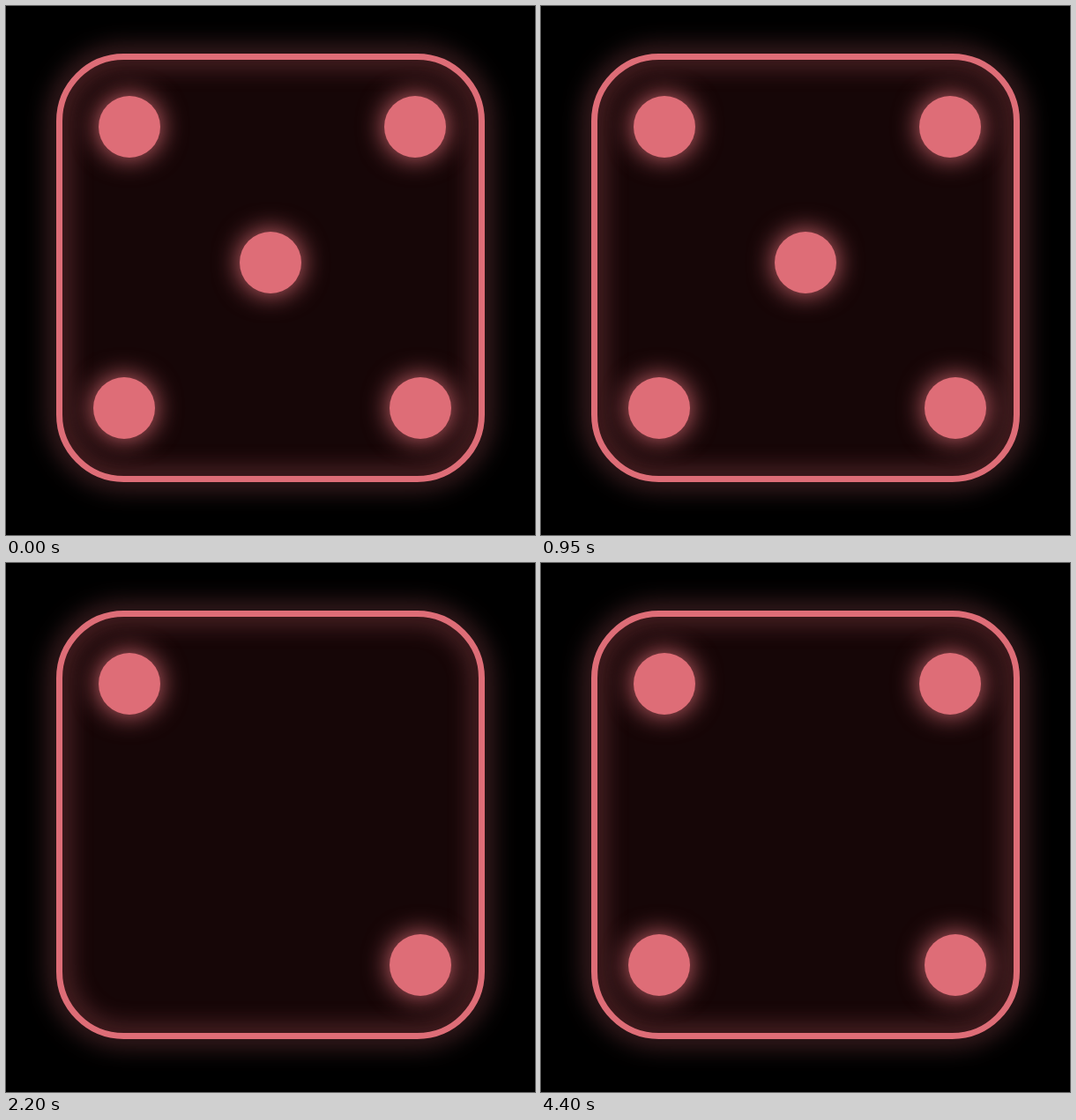
Animation of 600x600 px, one loop 9.4 s. Source, as an HTML page:

```html
<!DOCTYPE html>
<html lang="en">
<head>
<meta charset="utf-8">
<title>Rolling die</title>
<style>
  html, body { margin: 0; width: 100%; height: 100%; overflow: hidden; background: #000; }
  svg { display: block; width: 100%; height: 100%; }
</style>
</head>
<body>
<svg viewBox="0 0 600 600">
  <defs>
    <filter id="glow" filterUnits="userSpaceOnUse" x="0" y="0" width="600" height="600" color-interpolation-filters="sRGB">
      <feDropShadow dx="0" dy="0" stdDeviation="15" flood-color="#de6d77"/>
    </filter>
  </defs>
  <rect x="60.5" y="57.5" width="479" height="479" rx="73" fill="#160607"/>
  <rect x="60.5" y="57.5" width="479" height="479" rx="73" fill="none" stroke="#de6d77" stroke-width="7" filter="url(#glow)"/>
  <g id="pips" fill="#de6d77"></g>
</svg>
<script>
const LOOP = 9400;

const PIPS = {
  topLeft: [140, 137], topRight: [464, 137],
  midLeft: [136, 291], center: [300, 291], midRight: [467, 291],
  lowLeft: [134, 456], lowRight: [470, 456]
};

const two = ['topLeft', 'lowRight'];
const four = [...two, 'topRight', 'lowLeft'];
const FACES = {
  1: ['center'],
  2: two,
  3: [...two, 'center'],
  4: four,
  5: [...four, 'center'],
  6: [...four, 'midLeft', 'midRight']
};

// [start in ms, face]: the roll slows down until it rests
const ROLL = [
  [0, 5], [100, 1], [200, 6], [400, 2], [600, 3], [950, 5],
  [1300, 6], [1750, 4], [2200, 2], [2850, 3], [3500, 6], [4400, 4]
];

const group = document.getElementById('pips');
const circles = {};
for (const [name, [cx, cy]] of Object.entries(PIPS)) {
  const circle = document.createElementNS('http://www.w3.org/2000/svg', 'circle');
  const attrs = { cx, cy, r: 35, filter: 'url(#glow)' };
  for (const key in attrs) circle.setAttribute(key, attrs[key]);
  circles[name] = group.appendChild(circle);
}

function draw(time) {
  const face = ROLL.filter(([start]) => start <= time).pop()[1];
  for (const name in circles) {
    circles[name].style.display = FACES[face].includes(name) ? '' : 'none';
  }
}

const begin = performance.now();
function tick() {
  draw((performance.now() - begin) % LOOP);
  requestAnimationFrame(tick);
}
tick();
</script>
</body>
</html>
```
